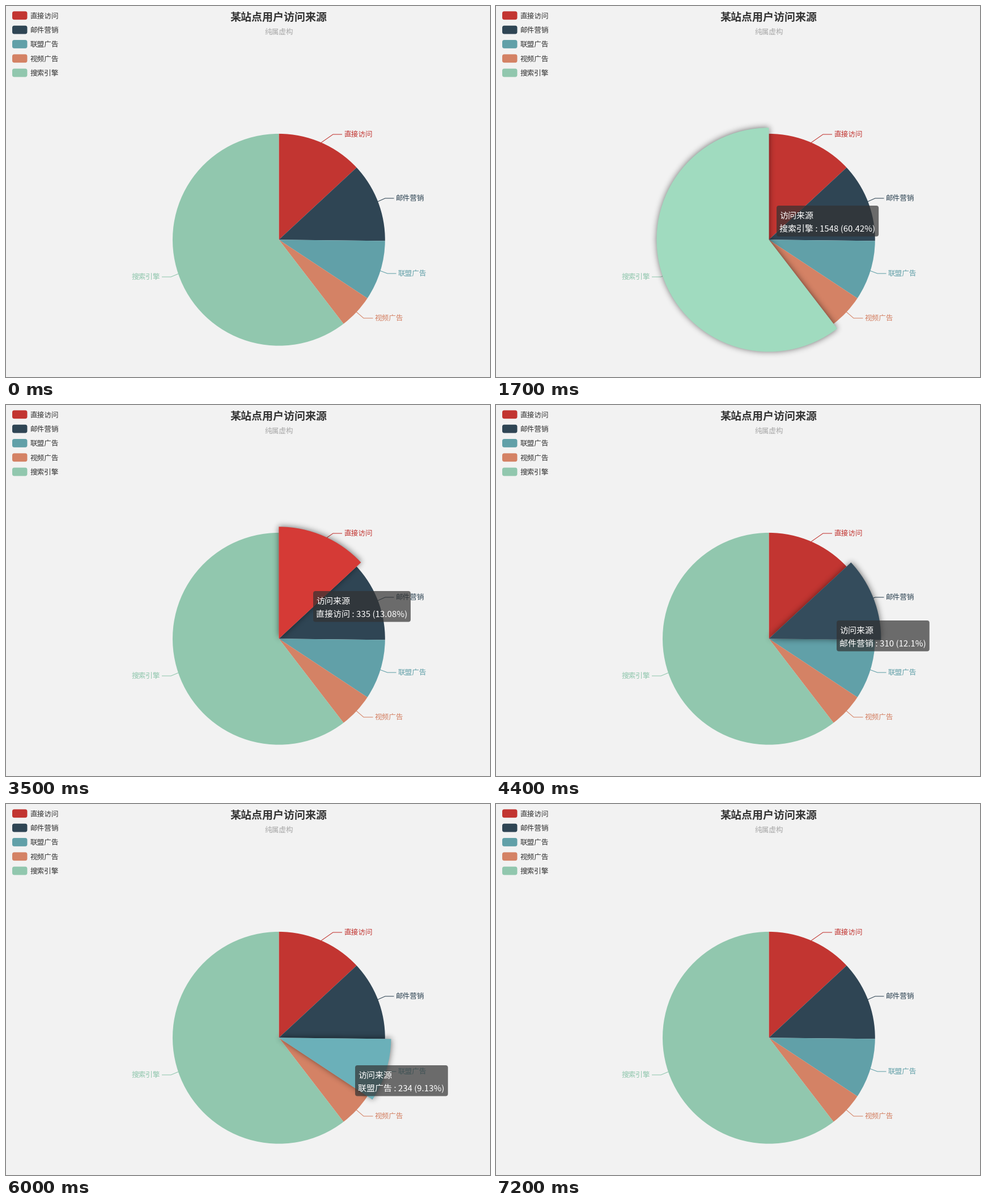
These frames come from a looping animation (854 by 656 pixels, 8 s). A matplotlib script:

```python
import numpy as np
import matplotlib.pyplot as plt
from matplotlib.animation import FuncAnimation
from matplotlib.colors import to_rgb
from matplotlib.patches import FancyBboxPatch, Wedge

W, H, DPI = 854, 656, 100
STEP, LOOP = 100, 8000
CX, CY, RADIUS, GROW = 481.4, 413.3, 187.4, 10.6
FONT = "Noto Sans CJK JP"
SERIES = "访问来源"

# name, value, colour, elbow of the leader line, end of the leader line
SLICES = [
    ("直接访问", 335, "#c23531", (577, 227), 592.5),
    ("邮件营销", 310, "#2f4554", (669, 340), 684),
    ("联盟广告", 234, "#61a0a8", (673, 473), 688),
    ("视频广告", 135, "#d48265", (631, 552), 647),
    ("搜索引擎", 1548, "#91c7ae", (291, 479), 275.5),
]
TOTAL = sum(s[1] for s in SLICES)
BOUNDS = np.cumsum([0] + [s[1] for s in SLICES]) / TOTAL * 360

# time of each hover change and the slice it selects
HOVERS = [(1000, 0), (1300, 4), (2700, 0), (3800, 1), (4700, 2), (6300, 3), (7000, None)]
TIP_HIDES = 7200
# tooltip stops: time, left, top
STOPS = [
    (1000, 377, 329), (1600, 495, 353), (2500, 495, 353), (3200, 542, 329),
    (3500, 542, 329), (4300, 601, 381), (4400, 601, 381), (5200, 612, 470),
    (5700, 614, 469), (5800, 614, 469), (6000, 616, 462), (6700, 617, 535),
    (6800, 617, 535), (7000, 618.5, 575),
]

# the small margin keeps the pixel size from rounding down
fig = plt.figure(figsize=((W + 0.01) / DPI, (H + 0.01) / DPI), dpi=DPI, facecolor="#f2f2f2")
ax = fig.add_axes([0, 0, 1, 1])
ax.axis("off")


def text(x, y, s, px, color, ha="left", z=2, **kw):
    """Place text with its ideographs vertically centred on y."""
    return ax.text(x, y + 0.38 * px, s, fontsize=px * 72 / DPI, color=color, ha=ha,
                   va="baseline", family=FONT, zorder=z, **kw)


def rounded(x, y, w, h, radius, color, z=2, **kw):
    box = FancyBboxPatch((x, y), w, h, boxstyle=f"round,pad=0,rounding_size={radius}",
                         fc=color, lw=0, zorder=z, **kw)
    return ax.add_patch(box)


def lift(color):
    return tuple(min(1, c * 1.1) for c in to_rgb(color))


def elastic_out(k):
    if k >= 1:
        return 1.0
    return 1 + 2 ** (-10 * k) * np.sin((k - 0.1) * 5 * np.pi)


# shadow canvas around the pie
X0, Y0, SIDE = 251, 183, 460
ys, xs = np.mgrid[0:SIDE, 0:SIDE] + 0.5
dx, dy = xs + X0 - CX, ys + Y0 - CY
dist = np.hypot(dx, dy)
bearing = (np.degrees(np.arctan2(dy, dx)) + 90) % 360
taps = np.arange(-16, 17)
kernel = np.exp(-taps ** 2 / (2 * 5.2 ** 2))
kernel /= kernel.sum()
shadow_cache = {}


def shadow_pixels(i, radius):
    key = i, round(radius, 2)
    if key not in shadow_cache:
        inside = (bearing >= BOUNDS[i]) & (bearing < BOUNDS[i + 1]) & (dist < radius)
        soft = inside.astype(float)
        for axis in (0, 1):
            soft = np.apply_along_axis(np.convolve, axis, soft, kernel, "same")
        rgba = np.zeros((SIDE, SIDE, 4))
        rgba[..., 3] = np.clip(0.5 * soft, 0, 1)
        shadow_cache[key] = rgba
    return shadow_cache[key]


text(CX, 18, "某站点用户访问来源", 19, "#333333", "center", fontweight="bold")
text(CX, 44.5, "纯属虚构", 12.66, "#aaaaaa", "center")

wedges = []
for i, (name, value, color, elbow, end) in enumerate(SLICES):
    row = 16.8 + 25.33 * i
    rounded(11, row - 7.4, 26.5, 14.8, 3.7, color)
    text(42.5, row, name, 12.66, "#333333")

    mid = np.radians((BOUNDS[i] + BOUNDS[i + 1]) / 2)
    start = CX + RADIUS * np.sin(mid), CY - RADIUS * np.cos(mid)
    ax.plot([start[0], elbow[0], end], [start[1], elbow[1], elbow[1]],
            color=color, lw=1.05 * 72 / DPI, zorder=1)
    side = 1 if end > CX else -1
    text(end + 3.5 * side, elbow[1] - 0.5, name, 12.66, color,
         "left" if side > 0 else "right")

    wedge = Wedge((CX, CY), RADIUS, BOUNDS[i] - 90, BOUNDS[i + 1] - 90,
                  fc=color, lw=0, zorder=3)
    wedges.append(ax.add_patch(wedge))

shadow = ax.imshow(np.zeros((SIDE, SIDE, 4)), extent=(X0, X0 + SIDE, Y0 + SIDE, Y0),
                   aspect="auto", interpolation="nearest", zorder=4)
tip_box = rounded(0, 0, 172, 54.5, 4.2, (50 / 255,) * 3, 10, alpha=0.7)
tip_lines = [text(0, 0, s, 15, "white", z=11) for s in (SERIES, "")]
ax.set_xlim(0, W)
ax.set_ylim(H, 0)


def tip_position(t):
    for (t0, *a), (t1, *b) in zip(STOPS, STOPS[1:]):
        if t <= t1:
            k = np.sin((t - t0) / (t1 - t0) * np.pi / 2)
            return [p + (q - p) * k for p, q in zip(a, b)]
    return STOPS[-1][1:]


def draw_tip(t, i):
    visible = HOVERS[0][0] <= t < TIP_HIDES
    for artist in (tip_box, *tip_lines):
        artist.set_visible(visible)
    if not visible:
        return
    name, value = SLICES[i][:2]
    label = f"{name} : {value} ({round(value / TOTAL * 100, 2):g}%)"
    digits = sum(c.isdigit() for c in label)
    x, y = tip_position(t)
    tip_box.set_bounds(x, y, 172 + 8.2 * (digits - 7), 54.5)
    tip_lines[1].set_text(label)
    for line, offset in zip(tip_lines, (17.2, 39.2)):
        line.set_position((x + 5, y + offset + 0.38 * 15))


def update(frame):
    t = frame * STEP
    past = [(None, None)] + [h for h in HOVERS if h[0] <= t]
    since, active = past[-1]
    previous = past[-2][1] if len(past) > 1 else None
    rise = elastic_out((t - since) / 300) if since is not None else 0

    for i, wedge in enumerate(wedges):
        share = rise if i == active else 1 - rise if i == previous else 0
        wedge.set_radius(RADIUS + GROW * share)
        color = SLICES[i][2]
        wedge.set_facecolor(lift(color) if i == active else color)
        wedge.set_zorder(5 if i == active else 3)

    shadow.set_visible(active is not None)
    if active is not None:
        shadow.set_data(shadow_pixels(active, wedges[active].r))
    draw_tip(t, previous if active is None else active)
    return []


anim = FuncAnimation(fig, update, frames=LOOP // STEP, interval=STEP,
                     repeat=True, repeat_delay=0, blit=False)
plt.show()
```
